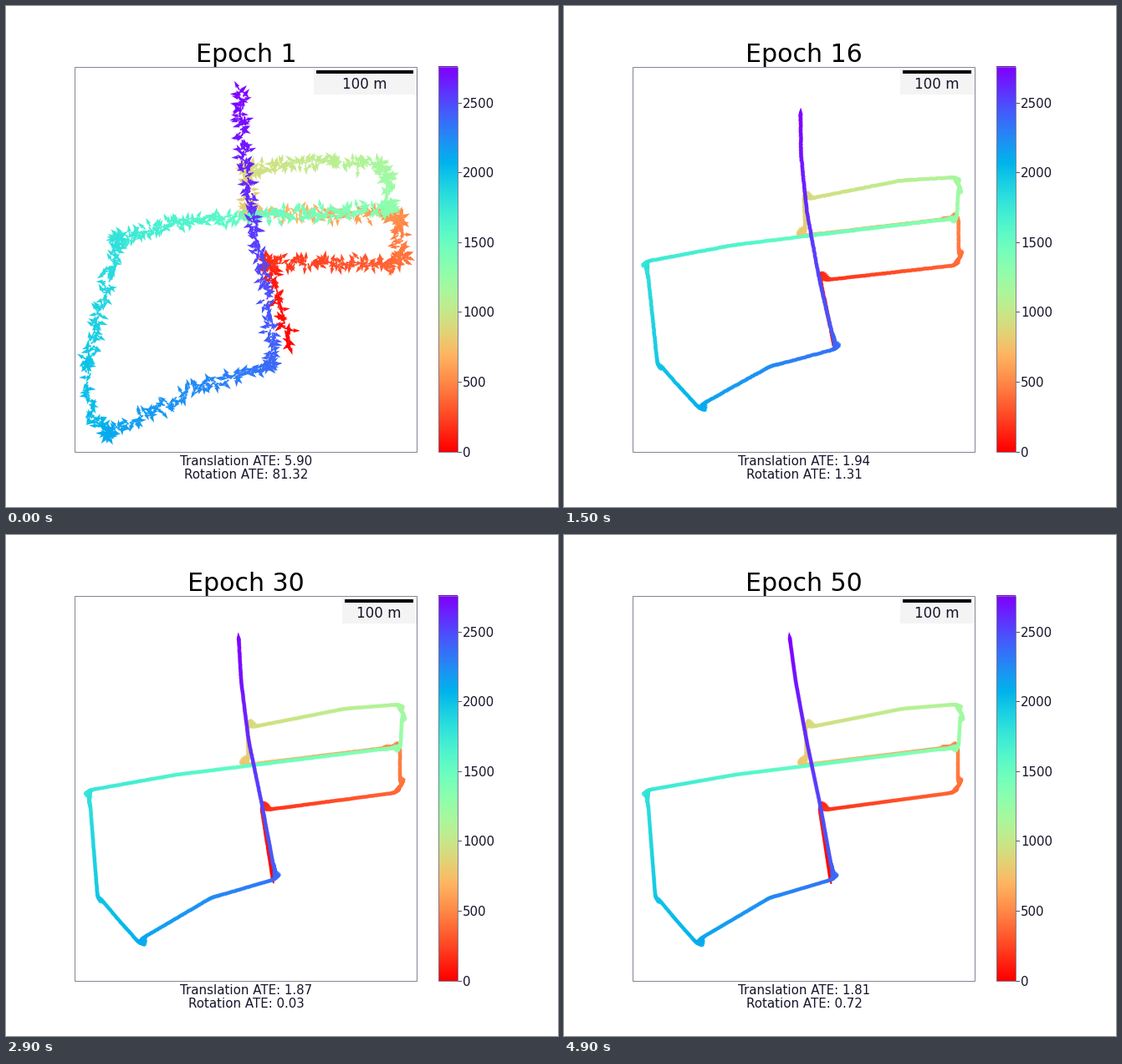
A matplotlib script for the animation above (7 s loop, 660 px wide and 600 px high).

```python
import numpy as np
import matplotlib.pyplot as plt
from matplotlib.animation import FuncAnimation
from matplotlib.patches import Rectangle

W, H, DPI = 660, 600, 100
EPOCHS, FRAMES, STEP_MS = 50, 70, 100
LAST = 2763
PT = 72 / DPI
INK = "#14142a"
ARROW = 12
DWELL = 30  # extra travel, in pixels, per radian of turning

# Each bend of the route: where it lies untrained, half trained and converged
BENDS = np.array([
    (340+410j, 335+396j, 320+421j),
    (313+307j, 308+326j, 306+330j),
    (463+309j, 468+316j, 462+309j),
    (473+300j, 475+307j, 471+301j),
    (471+254j, 473+256j, 471+258j),
    (460+250j, 464+256j, 462+254j),
    (290+248j, 286+274j, 290+275j),
    (287+195j, 282+234j, 289+231j),
    (390+185j, 400+211j, 405+208j),
    (447+190j, 460+211j, 466+203j),
    (455+205j, 466+220j, 474+212j),
    (460+242j, 465+250j, 472+250j),
    (452+243j, 455+255j, 462+255j),
    (215+258j, 200+284j, 205+287j),
    (134+278j, 100+306j, 103+305j),
    (131+292j, 99+314j, 100+314j),
    (97+425j, 117+414j, 109+431j),
    (101+490j, 142+438j, 133+460j),
    (122+513j, 167+463j, 157+487j),
    (230+456j, 245+426j, 245+435j),
    (315+430j, 328+408j, 319+413j),
    (319+408j, 328+400j, 321+404j),
    (305+310j, 303+338j, 307+327j),
    (290+225j, 291+245j, 290+246j),
    (281+145j, 282+185j, 277+175j),
    (281+97j, 280+144j, 270+124j),
])

KEYS = [1, 9, 16, 26, 35, 43, 50]
TRANS_ATE = [5.90, 3.35, 1.94, 1.90, 1.84, 1.76, 1.81]
ROT_ATE = [81.32, 21.08, 1.31, 0.01, 0.05, 1.27, 0.72]

t = np.arange(0, LAST + 1, 2)


def schedule(route):
    """Pose indices of arriving at and leaving each bend, slower in turns."""
    legs = np.diff(route)
    turns = np.abs(np.angle(legs[1:] / legs[:-1])) * DWELL
    wait = np.concatenate([[0], turns, [0]])
    leave = np.cumsum(wait) + np.concatenate([[0], np.cumsum(np.abs(legs))])
    scale = LAST / leave[-1]
    return (leave - wait) * scale, leave * scale


arrive, leave = schedule(BENDS[:, 2])
stops = np.column_stack([arrive, leave]).ravel()


def layout(epoch):
    early, half, final = BENDS.T
    if epoch < 9:
        return early + (half - early) * (epoch - 1) / 8
    final = final.copy()
    final[-2:] += np.array([7, 14]) * (EPOCHS - epoch) / 34
    return final + (half - final) * np.exp(-(epoch - 9) / 5.8)


def smooth(z, n):
    return np.convolve(np.pad(z, n // 2, mode="edge"), np.ones(n) / n, "valid")


def poses(epoch):
    """Arrow tails and headings, y pointing down."""
    bends = layout(epoch)
    pos = smooth(np.interp(t, stops, np.repeat(bends, 2)), 15)
    turn = np.unwrap(np.angle(np.diff(bends)))
    head = smooth(np.interp(t, stops[1:-1], np.repeat(turn, 2)), 11)

    rng = np.random.default_rng(epoch)
    noise = np.exp(np.interp(epoch, [1, 9, 16, 50],
                             np.log([1, .05, .02, .005])))
    lean = np.interp(epoch, [1, 9, 16], [.3, .55, 0])
    head += lean * np.sin(head) ** 2
    head += noise * rng.uniform(-np.pi, np.pi, t.size)
    jitter = rng.normal(size=t.size) + 1j * rng.normal(size=t.size)
    return pos + 2 * noise * jitter, head


fig = plt.figure(figsize=(W / DPI, H / DPI), dpi=DPI, facecolor="white")
ax = fig.add_axes([0, 0, 1, 1])


def label(x, y, s, px, color=INK, **kw):
    return ax.text(x, y, s, fontsize=px * PT, color=color,
                   family="DejaVu Sans", zorder=6, **kw)


ax.imshow(np.linspace(1, 0, 256)[:, None], cmap="rainbow_r", aspect="auto",
          extent=(517, 540, 534, 72), interpolation="bilinear")
for x, w in ((82, 409), (517, 23)):
    ax.add_patch(Rectangle((x, 73), w, 461, fill=False, ec="#77778a",
                           lw=.9 * PT, zorder=3))
for v in range(0, LAST, 500):
    y = 533.5 - v / LAST * 461.5
    ax.plot([540, 543.5], [y, y], color="#55556a", lw=PT)
    label(546, y + 6, v, 15)

arrows = ax.quiver(t, t, np.ones(t.size), np.zeros(t.size), t,
                   cmap="rainbow_r", units="dots", scale_units="dots",
                   scale=1 / ARROW, width=1.7, pivot="tail", zorder=2)
arrows.set_clim(0, LAST)

panel = ax.add_patch(Rectangle((0, 75), 1, 30.5, fc="#f4f4f4", zorder=4))
ruler = ax.add_patch(Rectangle((0, 77), 1, 4.2, fc="black", zorder=5))
span = label(0, 99, "100 m", 16.7, ha="center")
title = label(287, 67, "", 30, "black", ha="center")
trans_err = label(287, 550, "", 15, ha="center")
rot_err = label(287, 566, "", 15, ha="center")

ax.set_xlim(0, W)
ax.set_ylim(H, 0)
ax.axis("off")


def update(n):
    epoch = min(n + 1, EPOCHS)
    pos, head = poses(epoch)
    arrows.set_offsets(np.column_stack([pos.real, pos.imag]))
    arrows.set_UVC(np.cos(head), -np.sin(head), t)

    size = np.interp(epoch, [1, 9, 16], [115.5, 89.5, 82])
    ruler.set_x(486.5 - size)
    ruler.set_width(size)
    panel.set_x(483.5 - size)
    panel.set_width(size + 7.5)
    span.set_x(486.5 - size / 2)

    title.set_text(f"Epoch {epoch}")
    trans_err.set_text(
        f"Translation ATE: {np.interp(epoch, KEYS, TRANS_ATE):.2f}")
    rot_err.set_text(f"Rotation ATE: {np.interp(epoch, KEYS, ROT_ATE):.2f}")
    return arrows, panel, ruler, span, title, trans_err, rot_err


anim = FuncAnimation(fig, update, frames=FRAMES, interval=STEP_MS,
                     repeat=True, repeat_delay=0, blit=False)
plt.show()
```
